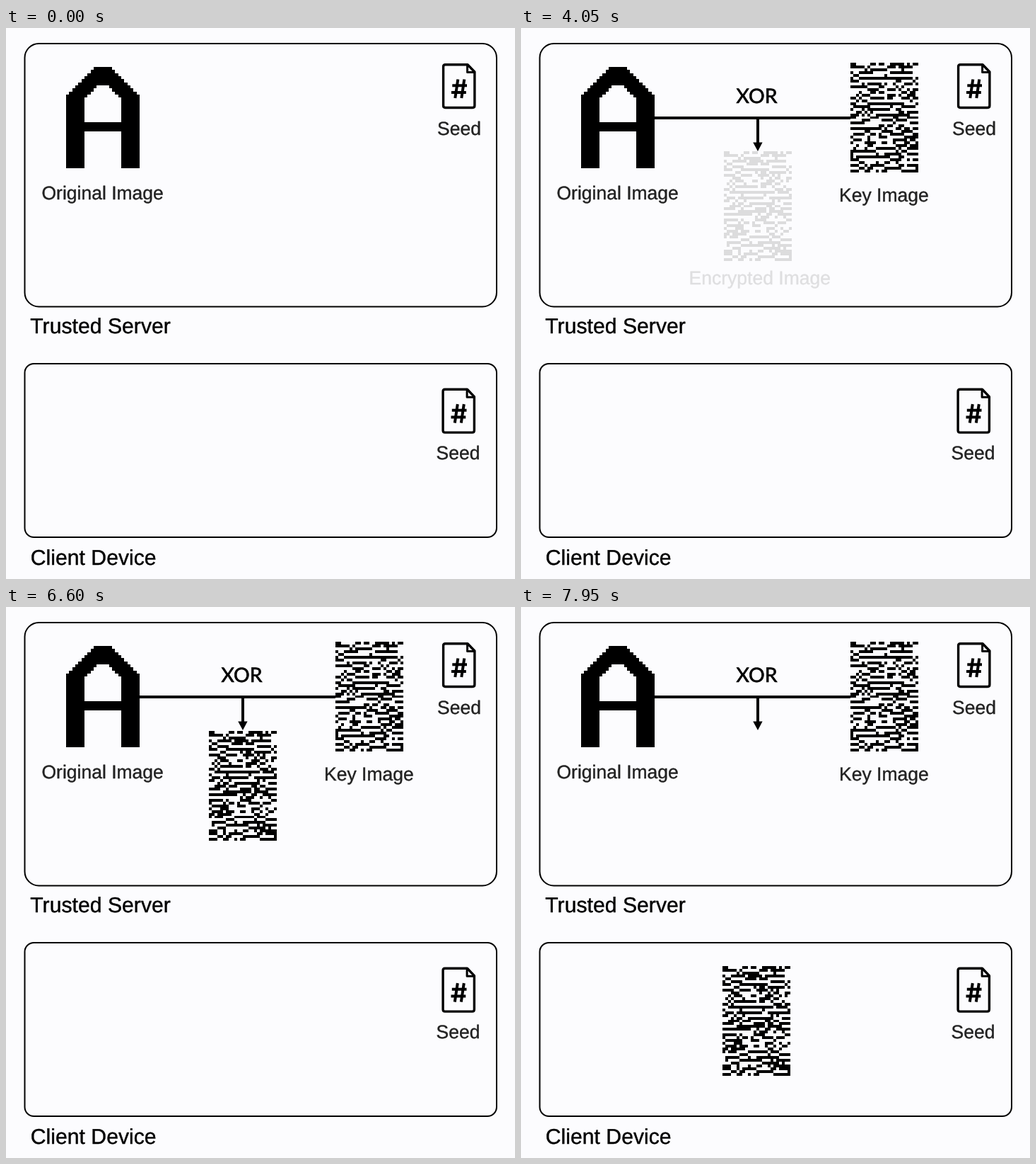
These frames come from a looping animation (720 px wide and 778 px high, 8 s). An HTML page:

```html
<!DOCTYPE html>
<html lang="en">
<head>
<meta charset="utf-8">
<title>Image encryption with a shared seed</title>
<style>
  html, body { margin: 0; width: 100%; height: 100%; overflow: hidden; background: #fcfcfe; }
  svg { display: block; width: 720px; height: 778px; }
  text {
    font-family: "Liberation Sans", Arial, sans-serif;
    text-rendering: geometricPrecision;
    stroke-width: .4;
  }
  .label { font-size: 26.5px; fill: #222; stroke: #222; }
  .place { font-size: 30.2px; fill: #000; stroke: #000; }
  .op { font-family: Lato, Carlito, sans-serif; font-size: 28.3px; text-anchor: middle; stroke: #000; stroke-width: .7; }
  .box { fill: none; stroke: #000; stroke-width: 2; }
  .cells { shape-rendering: crispEdges; }
</style>
</head>
<body>
<svg viewBox="0 0 720 778">
  <defs>
    <g id="seed" fill="none" stroke="#000" stroke-width="3.4" stroke-linejoin="round">
      <path d="M653 51.7H621.5Q618.6 51.7 618.6 54.6V109.6Q618.6 112.5 621.5 112.5H660Q662.9 112.5 662.9 109.6V62Z"/>
      <path d="M652.6 52.5V62.6H662.5" stroke-width="3"/>
      <path d="M639.3 72.5L635.3 99M648.3 72.5L644.3 99M631.3 81.2H652M630 91H650.8" stroke-width="4"/>
    </g>
  </defs>

  <rect class="box" x="26.5" y="22" width="667.5" height="371.5" rx="20"/>
  <rect class="box" x="26.5" y="474" width="667.5" height="245" rx="13"/>
  <text class="place" x="34.3" y="431">Trusted Server</text>
  <text class="place" x="34.8" y="757.5">Client Device</text>

  <use href="#seed"/>
  <text class="label" x="610" y="151">Seed</text>
  <use href="#seed" x="-.5" y="458.6"/>
  <text class="label" x="608.5" y="609">Seed</text>

  <path class="cells" id="letter"/>
  <text class="label" x="50.5" y="242">Original Image</text>

  <g id="key">
    <path class="cells" id="keyCells" transform="translate(466 49)"/>
    <text class="label" x="450" y="245">Key Image</text>
  </g>

  <g id="xor">
    <path d="M189 127H466" stroke="#000" stroke-width="4"/>
    <path d="M335 127V164" stroke="#000" stroke-width="4"/>
    <path d="M328.2 161.5H341.6L335 174Z"/>
    <text class="op" x="333.5" y="105.5">XOR</text>
  </g>

  <path class="cells" id="cipher"/>
  <text class="label" id="cipherLabel" x="237.6" y="362">Encrypted Image</text>
</svg>

<script>
const LOOP = 8000, STEP = 50;
const COLS = 24, ROWS = 39, LETTER_ROWS = 33, MARGIN = 3;
const $ = id => document.getElementById(id);

// Letter A on a 24 x 33 grid
function inLetter(c, r) {
  if (r < 0 || r >= LETTER_ROWS) return false;
  const side = Math.min(c, COLS - 1 - c);
  if (side < Math.max(0, 9 - r)) return false;
  const bar = r >= 18 && r < 21;
  const hole = r >= 6 && !bar && side >= Math.max(6, 16 - r);
  return !hole;
}

function random(seed) {
  return () => {
    seed = (seed + 0x6D2B79F5) | 0;
    let x = Math.imul(seed ^ (seed >>> 15), seed | 1);
    x ^= x + Math.imul(x ^ (x >>> 7), x | 61);
    return ((x ^ (x >>> 14)) >>> 0) / 4294967296;
  };
}

// Noise in short dashes: cells follow the left neighbour and oppose the one above
function makeKey() {
  const next = random(7), bits = [];
  const sign = i => bits[i] ? 1 : -1;
  for (let i = 0; i < COLS * ROWS; i++) {
    const left = i % COLS ? sign(i - 1) : 0;
    const above = i >= COLS ? sign(i - COLS) : 0;
    bits.push(next() < .5 + .13 * left - .25 * above);
  }
  return (c, r) => bits[r * COLS + c];
}

// Joins neighbouring dark cells of each row into one bar
function cellPath(dark, rows, w, h, x = 0, y = 0) {
  let d = "";
  for (let r = 0; r < rows; r++) {
    for (let c = 0; c < COLS; c++) {
      if (!dark(c, r)) continue;
      const from = c;
      while (c < COLS && dark(c, r)) c++;
      d += `M${x + from * w} ${y + r * h}h${(c - from) * w}v${h}h${(from - c) * w}z`;
    }
  }
  return d;
}

const keyBit = makeKey();
const cipherBit = (c, r) => keyBit(c, r) !== inLetter(c, r - MARGIN);
const unit = 104 / COLS;
$("letter").setAttribute("d", cellPath(inLetter, LETTER_ROWS, unit, unit, 85, 55));
$("keyCells").setAttribute("d", cellPath(keyBit, ROWS, 4, 155 / ROWS));
$("cipher").setAttribute("d", cellPath(cipherBit, ROWS, 4, 155 / ROWS));

const ramp = (t, start, length) => Math.min(1, Math.max(0, (t - start) / length));
const ease = u => u < .5 ? 2 * u * u : 1 - 2 * (1 - u) ** 2;
const fade = (id, value) => $(id).setAttribute("opacity", value);

function draw(t) {
  const shown = ramp(t, 3985, 500);
  const move = ease(ramp(t, 6540, 1370));
  fade("key", ramp(t, 1275, 550));
  fade("xor", ramp(t, 3275, 500));
  fade("cipher", shown);
  fade("cipherLabel", shown * (1 - ramp(t, 5985, 500)));
  $("cipher").setAttribute("transform", `translate(${287 - 2 * move} ${174 + 333 * move})`);
}

const start = performance.now();
function tick() {
  const t = (performance.now() - start) % LOOP;
  draw(Math.floor(t / STEP) * STEP);
  requestAnimationFrame(tick);
}
tick();
</script>
</body>
</html>
```
